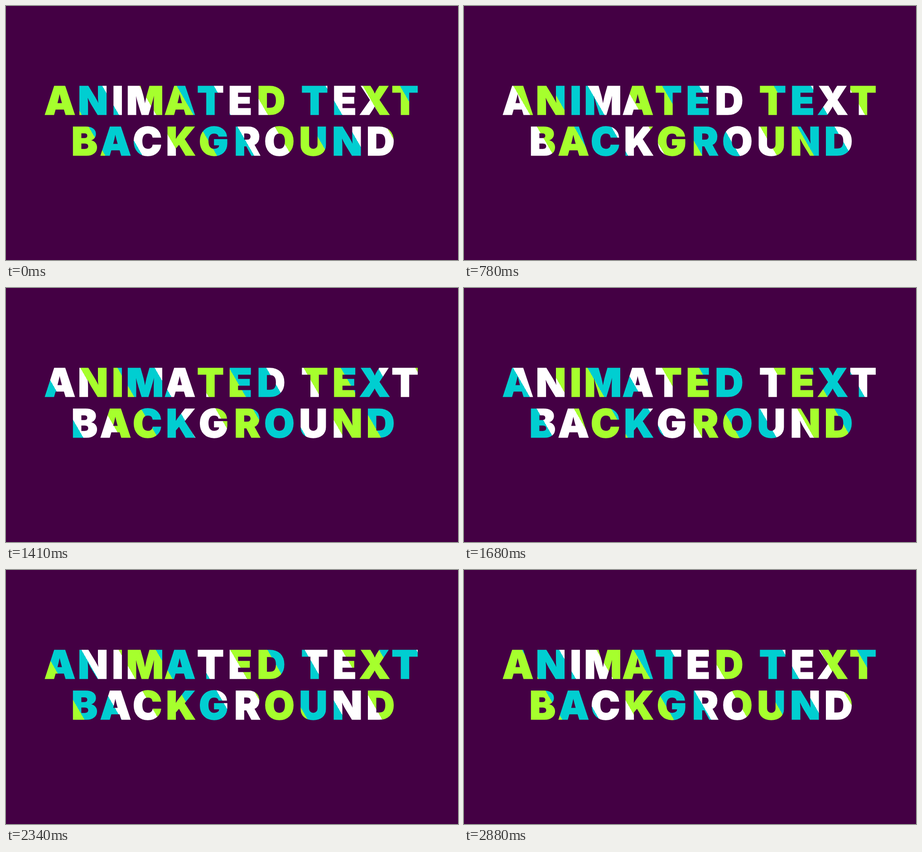
Write an HTML page that moves like this. It is 998 by 561 pixels and loops after 2910 ms.

```html
<!DOCTYPE html>
<html lang="en">
<head>
<meta charset="utf-8">
<title>Animated text background</title>
<style>
  html, body { margin: 0; width: 100%; height: 100%; overflow: hidden; background: #404; }
  svg { display: block; width: 100vw; height: 100vh; }
  text {
    font: 900 86.6px "Arial Black", Inter, sans-serif;
    text-anchor: middle;
    fill: url(#stripes);
    stroke: url(#stripes);
    stroke-width: 1.5;
    stroke-miterlimit: 3;
  }
</style>
</head>
<body>
<svg viewBox="0 0 998 561">
  <defs>
    <linearGradient id="stripes" gradientUnits="userSpaceOnUse" spreadMethod="repeat"></linearGradient>
  </defs>
  <!-- one centre per letter keeps the wide, even setting -->
  <text y="240" x="119 192 246.5 307 384 451.5 517 585.5 634 681.5 747.5 814 881">ANIMATED TEXT</text>
  <text y="329.8" x="173.5 242 312 386 458.5 533 603.5 678.5 753.5 827">BACKGROUND</text>
</svg>
<script>
  const LOOP = 2910, STEP = 30;
  const PERIOD = 246.5;                  // horizontal distance of one colour cycle
  const ORIGIN = { x: 294.5, y: 176 };
  const TILT = Math.PI / 6;
  const COLORS = ['#a6ff2d', '#00ced1', '#fff'];
  const PACE = [[0, 0], [1110, 0.35], [1950, 0.685], [LOOP, 1]];

  const stripes = document.getElementById('stripes');

  function setAttributes(node, attributes) {
    for (const name in attributes) node.setAttribute(name, attributes[name]);
    return node;
  }

  function buildStripes() {
    const length = PERIOD * Math.cos(TILT);
    setAttributes(stripes, {
      x1: ORIGIN.x,
      y1: ORIGIN.y,
      x2: ORIGIN.x + length * Math.cos(TILT),
      y2: ORIGIN.y - length * Math.sin(TILT)
    });
    COLORS.forEach((color, i) => {
      for (const edge of [i, i + 1]) {
        const stop = document.createElementNS('http://www.w3.org/2000/svg', 'stop');
        stripes.append(setAttributes(stop, { offset: edge / COLORS.length, 'stop-color': color }));
      }
    });
  }

  function progress(time) {
    const next = PACE.findIndex(([at]) => at > time);
    const [t0, p0] = PACE[next - 1], [t1, p1] = PACE[next];
    return p0 + (p1 - p0) * (time - t0) / (t1 - t0);
  }

  function render() {
    const time = Math.floor(performance.now() % LOOP / STEP) * STEP;
    stripes.setAttribute('gradientTransform', `translate(${PERIOD * progress(time)} 0)`);
    requestAnimationFrame(render);
  }

  buildStripes();
  render();
</script>
</body>
</html>
```
